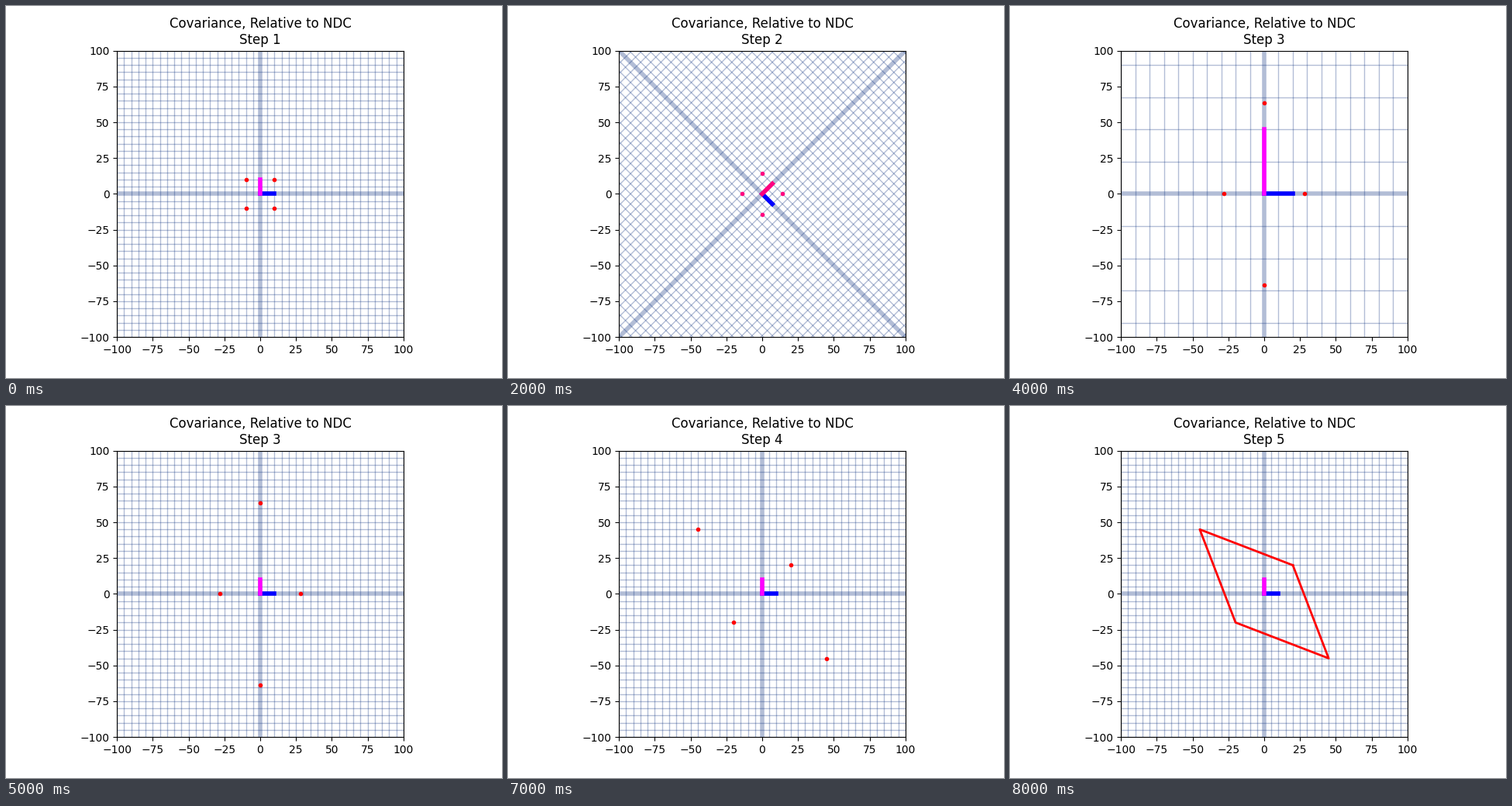
Animation of 640 by 480 pixels, one loop 10 s. Source, as a matplotlib script:

```python
import numpy as np
import matplotlib.pyplot as plt
from matplotlib.animation import FuncAnimation

LIMIT = 100
REACH = 200
GRID = "#002678"


def rotation(deg):
    a = np.radians(deg)
    return np.array([[np.cos(a), -np.sin(a)], [np.sin(a), np.cos(a)]])


EYE = np.eye(2)
TURN = rotation(-45)
SCALE = np.diag([2.0, 4.5])
BACK = rotation(45)

SQUARE = np.array([[10, 10], [10, -10], [-10, -10], [-10, 10]]).T
TURNED = TURN @ SQUARE
STRETCHED = SCALE @ TURNED
FINAL = BACK @ STRETCHED

# One entry per second: step number, basis, corner points
STATES = [
    (1, EYE, SQUARE),
    (1, EYE, SQUARE),
    (2, TURN, TURNED),
    (2, EYE, TURNED),
    (3, SCALE, STRETCHED),
    (3, EYE, STRETCHED),
    (4, BACK, FINAL),
    (4, EYE, FINAL),
    (5, EYE, FINAL),
    (5, EYE, FINAL),
]

fig, ax = plt.subplots(figsize=(6.4, 4.8), dpi=100)
ax.set_aspect("equal")
ax.set_xlim(-LIMIT, LIMIT)
ax.set_ylim(-LIMIT, LIMIT)
title = ax.set_title("")

# Each moving line is kept with its untransformed end points
segments = []


def add_segment(start, end, **style):
    line, = ax.plot([], [], **style)
    segments.append((line, np.array([start, end], dtype=float).T))
    return line


for c in range(-REACH, REACH + 1, 5):
    style = dict(color=GRID, alpha=0.3, lw=4 if c == 0 else 1)
    add_segment((c, -REACH), (c, REACH), **style)
    add_segment((-REACH, c), (REACH, c), **style)

x_axis = add_segment((0, 0), (10, 0), color="#0000ff", lw=4)
y_axis = add_segment((0, 0), (0, 10), color="#ff00ff", lw=4)
dots, = ax.plot([], [], ".", color="#ff0000")
outline, = ax.plot([], [], color="#ff0000", lw=2)


def update(i):
    step, basis, corners = STATES[i]
    title.set_text(f"Covariance, Relative to NDC\nStep {step}")
    for line, ends in segments:
        line.set_data(*(basis @ ends))

    tilted = abs(basis[0, 1]) > 0
    y_axis.set_color("#ff0080" if tilted else "#ff00ff")
    dots.set_color("#ff0080" if tilted else "#ff0000")

    closed = step == 5
    dots.set_data(*corners)
    dots.set_visible(not closed)
    outline.set_data(*np.column_stack([corners, corners[:, 0]]))
    outline.set_visible(closed)
    return []


anim = FuncAnimation(fig, update, frames=len(STATES), interval=1000,
                     repeat=True, repeat_delay=0, blit=False)
plt.show()
```
